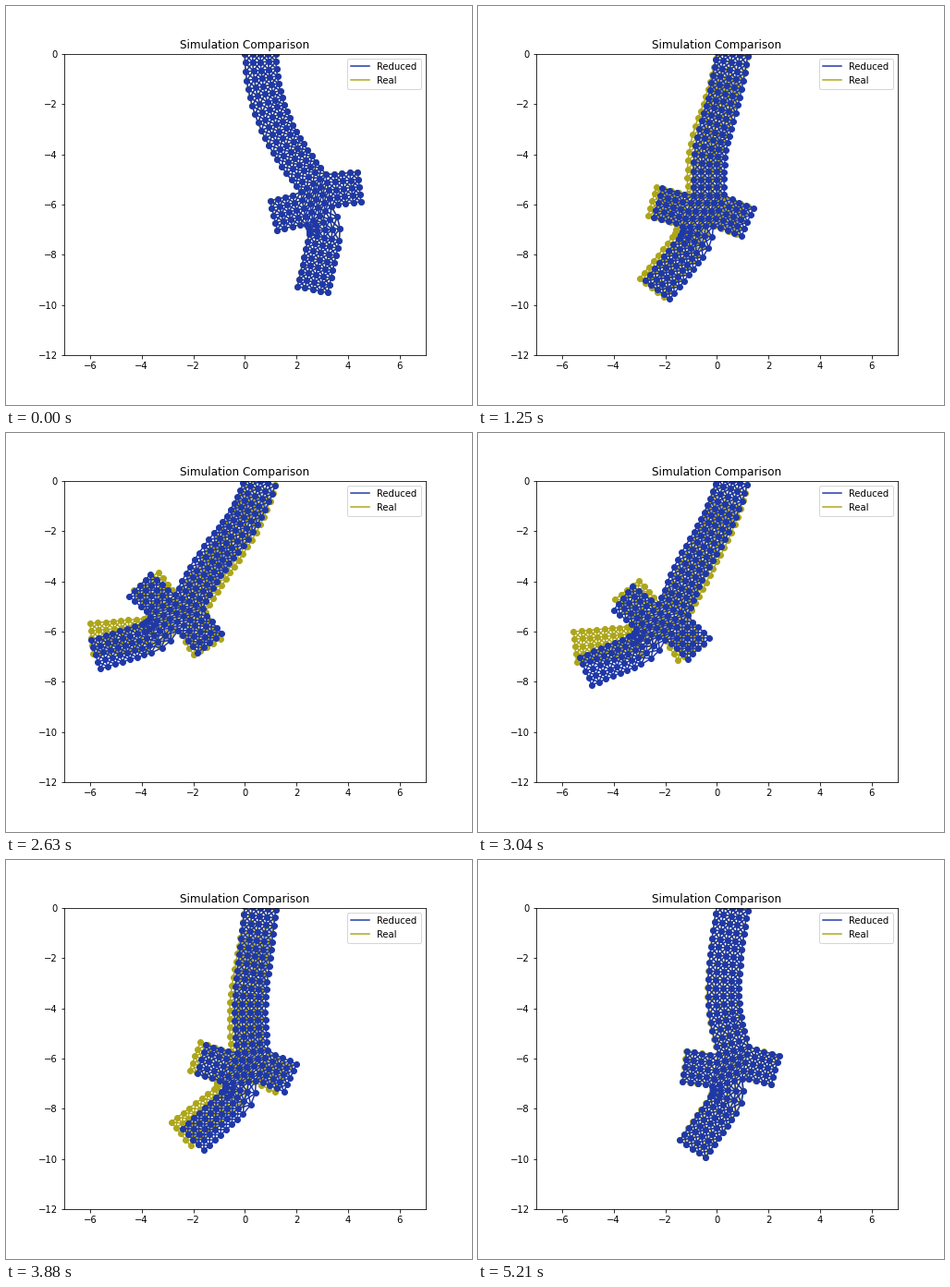
A matplotlib script for the animation above (5.25 s loop, 504 px wide and 432 px high).

```python
import numpy as np
import matplotlib.pyplot as plt
from matplotlib.animation import FuncAnimation
from matplotlib.lines import Line2D

FRAMES, LOOP_MS = 126, 5250
BLUE, GOLD = "#1f38a8", "#ada61a"

# Cross-shaped sheet: a 5-wide stem, with side arms on rows TOP..BOT
CELL, ROWS, TOP, BOT = 0.3, 33, 18, 22
MID = (TOP + BOT) // 2
SAG, DROOP = 0.09, np.radians(3.5)

# Evenly timed key poses in degrees: root, knee, hip, tail, arms
SWING = np.array([
    [0, 24, 37, -12, 10],
    [-5, -2, 17, -21, -1],
    [-12, -34, -20, -61, -43],
    [-18, -39, -27, -72, -47],
    [-10, -17, -7, -55, -30],
    [-3, 3, 19, -37, -10],
    [-10, -4, 15, -34, -11],
])
SLOPES = np.gradient(SWING, axis=0)


def columns(row):
    return range(-4, 9) if TOP <= row <= BOT else range(5)


NODES = [(r, c) for r in range(ROWS) for c in columns(r)]
INDEX = {node: i for i, node in enumerate(NODES)}
R, C = np.array(NODES).T


def mesh_edges():
    edges = []
    for r, c in NODES:
        right, down, across = (r, c + 1), (r + 1, c), (r + 1, c + 1)
        links = [((r, c), right), ((r, c), down)]
        if all(n in INDEX for n in (right, down, across)):
            links += [((r, c), across), (right, down)]
        edges += [(INDEX[a], INDEX[b]) for a, b in links if b in INDEX]
    return np.array(edges)


EDGES = mesh_edges()


def reduced_pose(x):
    """Cubic Hermite interpolation of the key poses, x in 0..1."""
    k, u = divmod(x * (len(SWING) - 1), 1)
    k = int(k)
    ease = u * u * (3 - 2 * u)
    bend = u * (1 - u) * ((1 - u) * SLOPES[k] - u * SLOPES[k + 1])
    return SWING[k] * (1 - ease) + SWING[k + 1] * ease + bend


def real_pose(x):
    """The reduced pose plus a stem wobble and a whip of the tail."""
    wobble = np.sin(3 * np.pi * x) * np.array([-3, -5, 0, 0, 0])
    whip = np.exp(-((x - 0.58) / 0.14) ** 2) * np.array([0, 0, -6, -18, -13])
    return reduced_pose(x) + wobble + whip


def place(pose):
    """Node positions as complex numbers x + iy."""
    root, knee, hip, tail, lean = np.radians(pose)
    rows = np.arange(ROWS)
    tilt = np.interp(rows, [0, 9, 16, BOT, 25], [root, knee, hip, hip, tail])

    # The stem stretches under its load, most where it hangs straight
    heading = (tilt[1:] + tilt[:-1]) / 2
    load = 1 - rows[1:] / ROWS
    step = CELL * (1 + SAG * load * np.cos(2 * heading))
    heading[TOP:BOT] = lean
    step[TOP:BOT] = 1.1 * CELL
    spine = 2 * CELL - 1j * np.append(0, np.cumsum(step * np.exp(1j * heading)))

    across = np.exp(1j * tilt)
    points = spine[R] + (C - 2) * CELL * across[R]
    for side in (-1, 1):
        arm = lean - side * DROOP
        out = side * (C - 2) - 2
        on = out > 0
        base = spine[MID] + side * 2 * CELL * across[MID]
        offset = side * out[on] - 1j * (R[on] - MID)
        points[on] = base + CELL * offset * np.exp(1j * arm)
    return points


fig, ax = plt.subplots(figsize=(7, 6), dpi=72)
fig.subplots_adjust(left=0.125, right=0.9, bottom=0.125, top=0.88)
ax.set_xlim(-7, 7)
ax.set_ylim(-12, 0)
ax.set_title("Simulation Comparison")
ax.legend(handles=[Line2D([], [], color=BLUE, label="Reduced"),
                   Line2D([], [], color=GOLD, label="Real")],
          loc="upper right")


def add_mesh(pose, color):
    wires, = ax.plot([], [], "-", color=color)
    dots, = ax.plot([], [], "o", color=color)
    return pose, wires, dots


meshes = [add_mesh(real_pose, GOLD), add_mesh(reduced_pose, BLUE)]


def update(i):
    artists = []
    for pose, wires, dots in meshes:
        p = place(pose(i / FRAMES))
        ends = p[EDGES]
        gap = np.full((len(EDGES), 1), np.nan)
        wires.set_data(np.hstack([ends.real, gap]).ravel(),
                       np.hstack([ends.imag, gap]).ravel())
        dots.set_data(p.real, p.imag)
        artists += [wires, dots]
    return artists


anim = FuncAnimation(fig, update, frames=FRAMES, interval=LOOP_MS / FRAMES,
                     init_func=lambda: update(0), repeat=True, repeat_delay=0,
                     blit=False)
plt.show()
```
